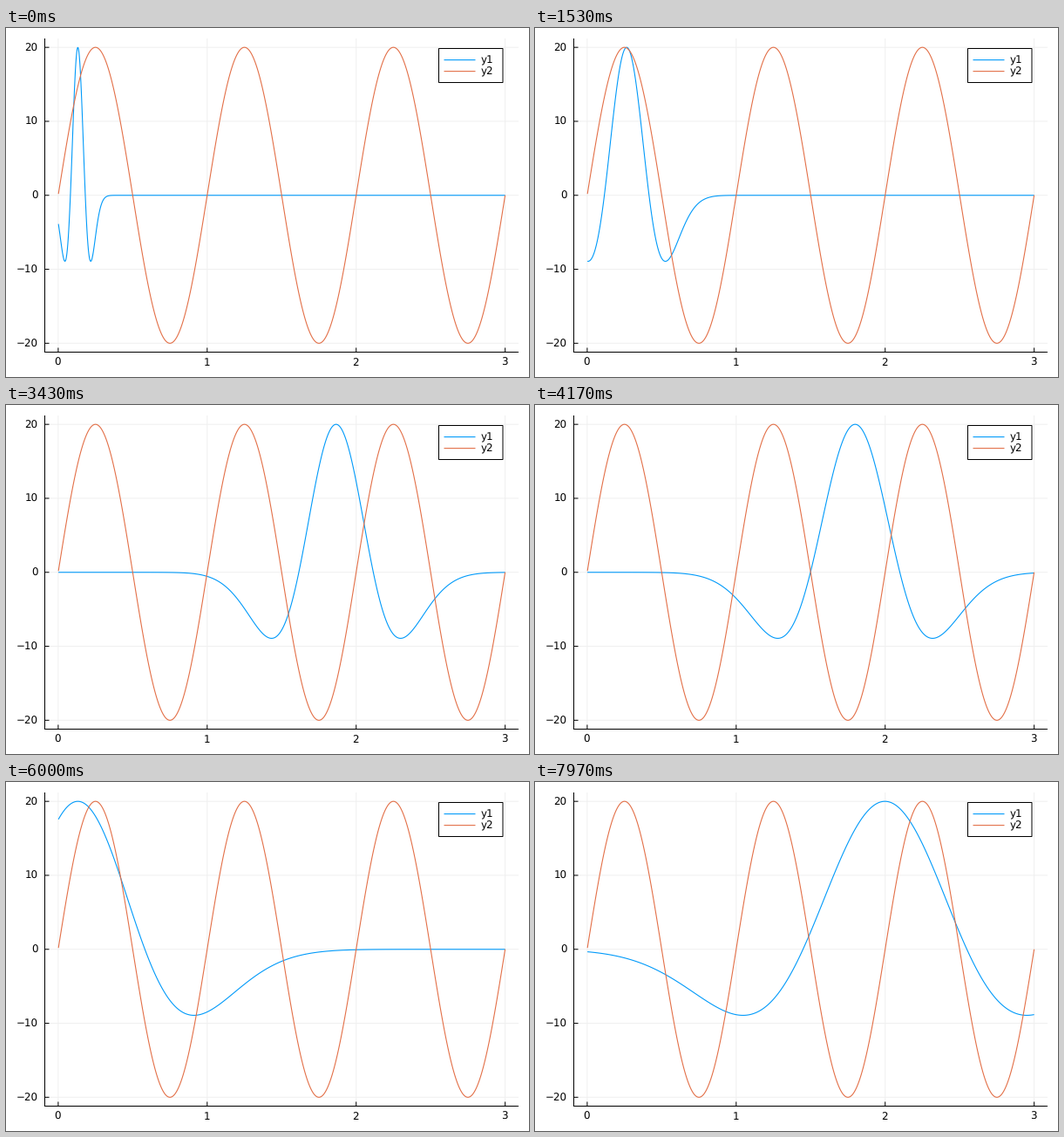
Animation of 600x400 px, one loop 8 s. Source, as a matplotlib script:

```python
import numpy as np
import matplotlib.pyplot as plt
from matplotlib.animation import FuncAnimation
from matplotlib.patches import Rectangle

plt.rcParams["font.family"] = "DejaVu Sans"
plt.rcParams["text.hinting"] = "none"
plt.rcParams["path.simplify"] = False

W, H, DPI = 600, 400, 100
TICK, LOOP = 20, 8000          # ms
LEFT, RIGHT, TOP, BOTTOM = 44.5, 588, 12, 371.5
BLUE, ORANGE, GRID = "#009afa", "#e36f47", "#f0f0f0"
PX = 72 / DPI                  # one pixel in points
AMP = 20
STOPS = 45                     # wavelet centres per width
OFFSET = 0.0015


def sx(x):
    return LEFT + (x + 0.09) / 3.18 * (RIGHT - LEFT)


def sy(y):
    return BOTTOM - (y + 21.2) / 42.4 * (BOTTOM - TOP)


def ricker(x, center, width):
    u2 = ((x - center) / width) ** 2
    return AMP * (1 - u2) * np.exp(-u2 / 2)


fig = plt.figure(figsize=(W / DPI, H / DPI), dpi=DPI, facecolor="white")
ax = fig.add_axes([0, 0, 1, 1])
ax.set_xlim(0, W)
ax.set_ylim(H, 0)
ax.axis("off")


def line(xs, ys, color="black", width=1.0, z=2):
    return ax.plot(xs, ys, color=color, lw=width * PX, zorder=z, snap=False,
                   solid_capstyle="butt")[0]


def label(x, y, text, ha, z=2):
    ax.text(x, y + 4.3, text, ha=ha, va="baseline", fontsize=8.6, zorder=z)


# Grid, ticks and axes
for v in range(4):
    x = sx(v)
    line([x, x], [TOP, BOTTOM], GRID, z=1)
    line([x, x], [BOTTOM, BOTTOM - 5])
    label(x - 0.5, 382.8, str(v), "center")
for v in range(-20, 21, 10):
    y = sy(v)
    line([LEFT, RIGHT], [y, y], GRID, z=1)
    line([LEFT, LEFT + 5], [y, y])
    label(36.5, y, str(v).replace("-", "\u2212"), "right")
line([LEFT, LEFT], [TOP, BOTTOM + 0.5])
line([LEFT - 0.5, RIGHT], [BOTTOM, BOTTOM])

# Curves
t = np.linspace(OFFSET, 3, 1000)
wave = line(sx(t), sy(0 * t), BLUE, 1.1, z=3)
line(sx(t), sy(AMP * np.sin(2 * np.pi * t)), ORANGE, 1.1, z=4)

# Legend
ax.add_patch(Rectangle((496.5, 23.5), 73.5, 39, facecolor="white",
                       edgecolor="black", lw=PX, zorder=5, snap=False))
for y, color, name in ((36.6, BLUE, "y1"), (49.6, ORANGE, "y2")):
    line([502.5, 538.5], [y, y], color, 1.1, z=6)
    label(544.5, y, name, "left", z=6)


def update(i):
    # three poses every five ticks, i.e. 30 per second
    pose = (3 * i + 2) // 5
    row, stop = divmod(2 * pose + 1, STOPS)
    center = (stop + 1) / 15 - OFFSET
    wave.set_ydata(sy(ricker(t, center, 0.05 * (row + 1))))
    return (wave,)


anim = FuncAnimation(fig, update, frames=LOOP // TICK, interval=TICK,
                     init_func=lambda: update(0), repeat=True, repeat_delay=0,
                     blit=False)
plt.show()
```
